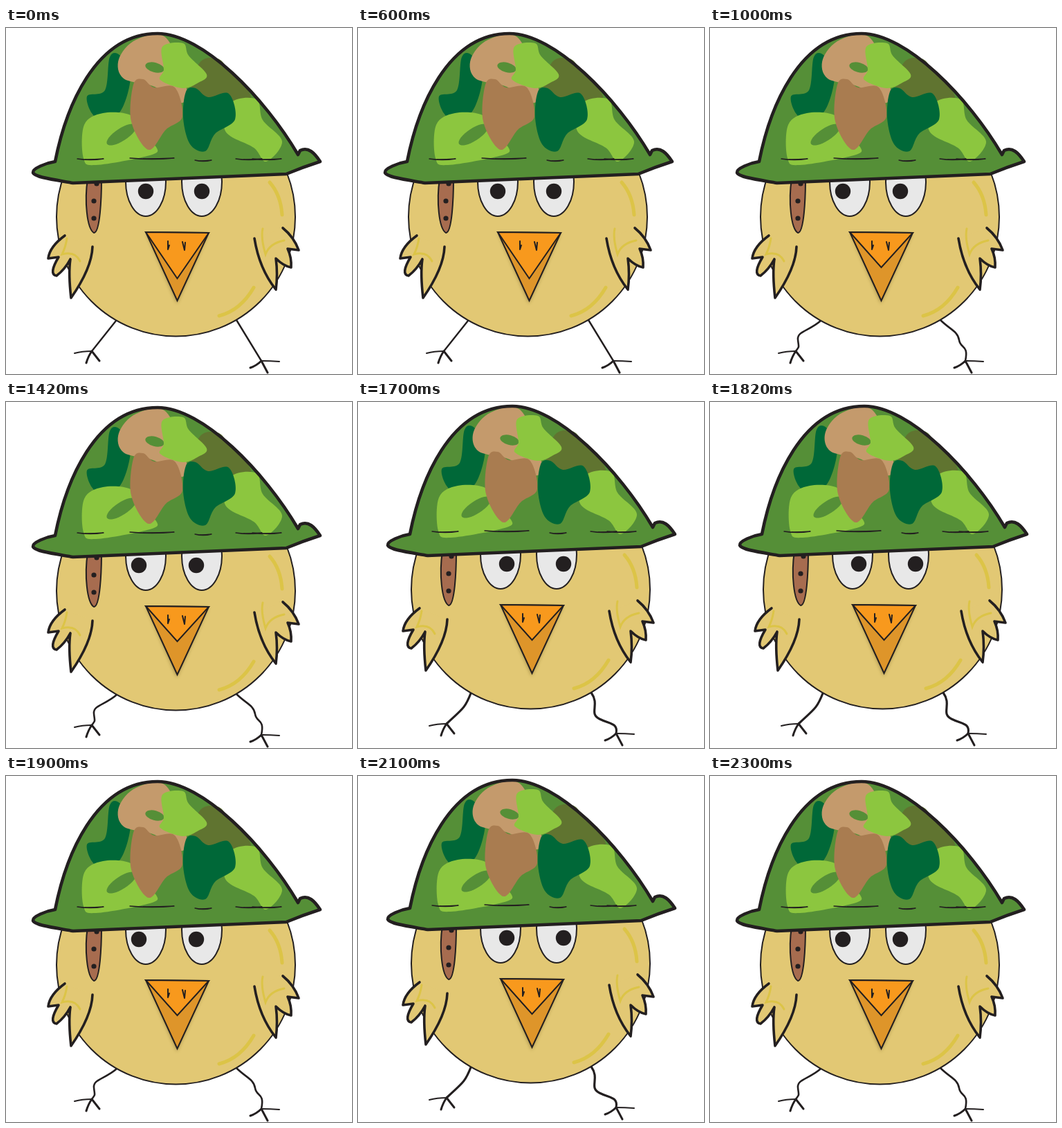
Write an HTML page that moves like this. It is 500 px wide and 500 px high and loops after 2.5 s.

```html
<!DOCTYPE html>
<html lang="en">
<head>
<meta charset="utf-8">
<title>Chick in a helmet</title>
<style>
  html, body { margin: 0; width: 100%; height: 100%; overflow: hidden; background: #fff; }
  svg { display: block; width: 100%; height: 100%; }
  .line { fill: none; stroke: #231f20; stroke-linecap: round; stroke-linejoin: round; }
  .glow { fill: none; stroke: #dcc447; stroke-linecap: round; }
</style>
</head>
<body>
<svg viewBox="0 0 500 500">
  <defs>
    <filter id="soft" x="-20%" y="-20%" width="140%" height="140%"><feGaussianBlur stdDeviation="2.5"/></filter>
  </defs>
  <g id="chick">
    <path id="legs" class="line"/>
    <g id="feet" class="line" stroke-width="3"></g>
    <circle cx="245.5" cy="273" r="172.5" fill="#e2c874" stroke="#231f20" stroke-width="2"/>
    <path class="glow" stroke-width="5" d="M381 223Q397 241 399 270M308 416Q339 408 358 375"/>

    <g class="line" stroke-width="3.6">
      <path style="fill:#e2c874" d="M85 300Q63 316 61 333L76 331Q61 356 73 358Q85 349 93 334Q90 355 94 390Q124 347 125 316"/>
      <path style="fill:#e2c874" d="M359 304Q366 348 390 378Q393 356 390 333Q401 344 412 346Q413 332 407 319L423 321Q416 302 400 289"/>
    </g>
    <path class="glow" stroke-width="3" d="M88 304Q86 317 81 327Q100 322 107 337M371 290Q368 303 375 327Q381 311 402 307"/>

    <g id="eyes"></g>

    <g id="strap">
      <path d="M118 218C113 250 117 290 127 296C136 296 138 245 138 218Z" fill="#a76c4f" stroke="#231f20" stroke-width="2"/>
    </g>

    <path d="M203 297L292 298L247 398Z" fill="#6b5520" opacity=".5" filter="url(#soft)"/>
    <g stroke="#231f20" stroke-width="2">
      <path d="M202 295L293 296L247.5 394Z" fill="#de952a"/>
      <path id="upperBeak" fill="#f8991d"/>
    </g>
    <path class="line" stroke-width="2" d="M234 308V320L236 314M255 309L258 321L259 310"/>

    <path id="shell" fill="#558f37"/>
    <g id="camo"></g>
    <path id="rim" class="line" stroke-width="4.6"/>
  </g>
</svg>
<script>
const $ = id => document.getElementById(id);
const LOOP = 2500, INK = '#231f20';

function add(parent, tag, attrs) {
  const el = document.createElementNS('http://www.w3.org/2000/svg', tag);
  for (const name in attrs) el.setAttribute(name, attrs[name]);
  return $(parent).appendChild(el);
}

// Closed smooth curve through a few key points, written as "x,y x,y ..."
function patch(fill, keys) {
  const pts = keys.split(' ').map(p => p.split(',').map(Number));
  const at = i => pts[(i + pts.length) % pts.length];
  const d = pts.map((p, i) => {
    const [before, next, after] = [at(i - 1), at(i + 1), at(i + 2)];
    const out = p.map((v, k) => v + (next[k] - before[k]) / 6);
    const into = next.map((v, k) => v - (after[k] - p[k]) / 6);
    return `C${out} ${into} ${next}`;
  });
  add('camo', 'path', { fill, d: `M${pts[0]}${d.join('')}Z` });
}

function hole(x, y, rx, ry, tilt) {
  add('camo', 'ellipse', { rx, ry, fill: '#558f37', transform: `translate(${x} ${y}) rotate(${tilt})` });
}

// Thin crease with a slightly bowed double stroke
function crease(x, y, width) {
  add('camo', 'path', {
    class: 'line', 'stroke-width': 1.3,
    d: `M${x} ${y}q${width / 2} 3 ${width} 0q${-width / 3} 1 ${-width * 0.7} 1`
  });
}

const helmet = 'M71 193C86 117 128 8 219 8C284 8 374 101 422 183L425 177C437 171 446 181 454 193' +
  'Q429 201 405 211L97 224C75 220 41 216 39 209C38 203 58 195 71 193Z';
$('shell').setAttribute('d', helmet);
$('rim').setAttribute('d', helmet);

const DARK = '#006838', LIME = '#8cc63f';
patch(DARK, '150,42 165,40 180,70 164,122 130,129 117,99 143,90');
patch('#607430', '280,50 305,44 322,60 354,100 318,112 270,94');
patch('#c49a6c', '163,45 188,17 232,15 262,92 248,108 215,85 170,73');
hole(215, 57, 14, 7, 15);
patch(LIME, '226,27 256,22 264,40 290,67 278,79 255,87 223,75 228,60');
patch(LIME, '113,140 140,123 180,126 190,150 217,172 208,184 130,198 112,188');
hole(167, 154, 25, 9, -33);
patch('#a97c50', '184,82 198,74 214,86 244,86 255,128 231,147 206,176 181,135');
patch(LIME, '325,108 362,103 371,133 399,164 376,193 358,173 317,149');
patch(DARK, '260,92 274,87 292,100 322,95 331,132 302,153 288,178 266,168 256,130');

[[103, 189, 38], [179, 188, 64], [273, 191, 24], [332, 189, 38], [356, 189, 42]].forEach(c => crease(...c));

for (const x of [202, 283]) {
  add('eyes', 'ellipse', { cx: x, cy: 222, rx: 29, ry: 50, fill: '#e8e8e8', stroke: INK, 'stroke-width': 2 });
}
const pupils = [0, 81].map(() => add('eyes', 'circle', { cy: 236, r: 11.2, fill: INK }));
for (const y of [225, 250, 275]) add('strap', 'circle', { cx: y < 250 ? 131 : 127, cy: y, r: 3.6, fill: INK });

add('feet', 'path', { d: 'M124 467q-5 7-8 17m8-17l11 14M369 481q-7 7-16 10m16-10l9 17' });
add('feet', 'path', { d: 'M99 470q11-3 25-3M369 481q13 0 26 1', 'stroke-width': 2 });

const poses = {
  rest: {
    shift: [0, 0], pupils: [202, 283], tip: 362, weight: 2.4,
    legs: 'M159 423L124 467M333 422L369 481'
  },
  left: {
    shift: [0, 0], pupils: [192, 275], tip: 346, weight: 2.6,
    legs: 'M160 423C143 438 126 438 127 450S130 459 124 467M333 422C347 436 358 438 360 451S374 457 369 481'
  },
  right: {
    shift: [4, -2], pupils: [211, 293], tip: 346, weight: 3.2,
    legs: 'M159 423C150 446 146 446 124 467M333 422C346 440 329 452 345 460S372 466 369 481'
  }
};

function poseAt(t) {
  if (t < 1000) return poses.rest;
  if (t < 1700) return poses.left;
  return Math.floor((t - 1700) / 200) % 2 ? poses.left : poses.right;
}

function draw(t) {
  const pose = poseAt(t);
  $('chick').setAttribute('transform', `translate(${pose.shift})`);
  pupils.forEach((pupil, i) => pupil.setAttribute('cx', pose.pupils[i]));
  $('upperBeak').setAttribute('d', `M202 295L293 296L247.5 ${pose.tip}Z`);
  $('legs').setAttribute('d', pose.legs);
  $('legs').setAttribute('stroke-width', pose.weight);
}

function tick() {
  draw(performance.now() % LOOP);
  requestAnimationFrame(tick);
}
tick();
</script>
</body>
</html>
```
